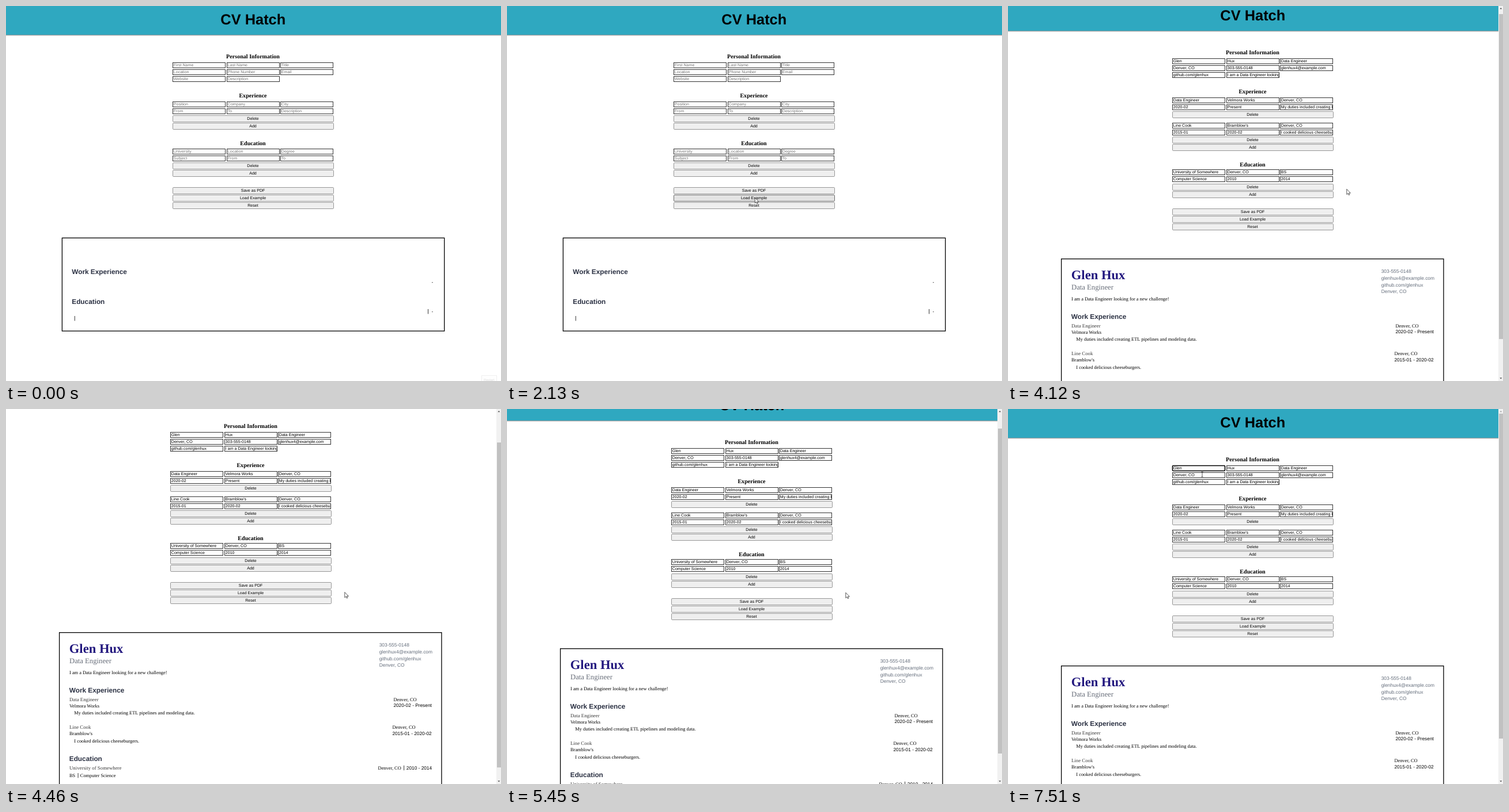
Recreate the animation shown at these times as an HTML page. Size 859 by 652 pixels, loop 8000 ms.

```html
<!DOCTYPE html>
<html lang="en">
<head>
<meta charset="utf-8">
<title>CV Hatch</title>
<style>
  html, body { margin: 0; width: 100%; height: 100%; overflow: hidden; background: #fff; }
  #stage { display: block; width: 859px; height: 652px; }
  text { text-rendering: geometricPrecision; white-space: pre; }
  .sans { font-family: "Liberation Sans", Arial, sans-serif; }
  .serif { font-family: "Liberation Serif", "Times New Roman", serif; }
  .bold { font-weight: bold; }
  .mid { text-anchor: middle; }
  .field { fill: #fff; stroke: #333; stroke-width: 1; }
  .field.focus { stroke: #000; stroke-width: 1.6; rx: 1.2px; }
  .btn { fill: #efefef; stroke: #8c8c8c; stroke-width: .9; }
  .btn.hover { fill: #e3e3e3; stroke: #5c5c5c; }
</style>
</head>
<body>
<svg id="stage" viewBox="0 0 859 652"></svg>
<script>
const LOOP = 8000, TICK = 66.5;
const LOADED = 2790, CLICKED = 6970, BLINK = 530;
const SHIFT = 43.6;              // height of a second job entry
const stage = document.getElementById('stage');

function add(parent, tag, attrs, content) {
  const el = document.createElementNS('http://www.w3.org/2000/svg', tag);
  for (const k in attrs) el.setAttribute(k, attrs[k]);
  if (content !== undefined) el.textContent = content;
  parent.appendChild(el);
  return el;
}
const label = (g, x, y, size, cls, s, fill = '#000') =>
  add(g, 'text', { x, y, 'font-size': size, class: cls, fill }, s);
const show = (el, on) => { el.style.display = on ? '' : 'none'; };
const snap = v => Math.round(v) + .5;

// ---------- form ----------
function makeView(width, left, ink) {
  const g = add(stage, 'g', {});
  const mid = left + 139.5, fields = [], buttons = [];

  add(g, 'rect', { width, height: 50, fill: '#2fa8c0' });
  add(g, 'rect', { y: 50, width, height: 1, fill: '#8b9a9e' });
  add(g, 'rect', { y: 51, width, height: .7, fill: '#d0d0d0' });
  label(g, width / 2 - .7, 32, 25.4, 'sans bold mid', 'CV Hatch');

  const head = (y, s) => label(g, mid, y, 10.1, 'serif bold mid', s);

  // fields wrap after three
  const inputs = (top, texts) => texts.forEach((s, i) => {
    const box = { x: snap(left + i % 3 * 93.6), y: snap(top + Math.floor(i / 3) * 12), width: 91, height: 9 };
    const el = add(g, 'rect', { class: 'field', ...box });
    label(add(g, 'svg', box), 1.3, 6.8, 7.07, 'sans', s, ink);
    fields.push({ el, ...box });
  });
  const actions = (top, ...names) => names.forEach((s, i) => {
    const box = { x: left + .5, y: snap(top + i * 13), width: 279, height: 11 };
    const el = add(g, 'rect', { class: 'btn', rx: 1.3, ...box });
    label(g, mid, box.y + 7.9, 7.07, 'sans mid', s);
    buttons.push({ el, ...box });
  });

  const build = (personal, jobs, school) => {
    const extra = (jobs.length - 1) * SHIFT;
    head(91.3, 'Personal Information');
    inputs(98, personal);
    head(159.4, 'Experience');
    jobs.forEach((job, i) => {
      inputs(166 + i * SHIFT, job);
      actions(190 + i * SHIFT, 'Delete');
    });
    actions(203 + extra, 'Add');
    head(241.9 + extra, 'Education');
    inputs(247.8 + extra, school);
    actions(272 + extra, 'Delete', 'Add');
    actions(315 + extra, 'Save as PDF', 'Load Example', 'Reset');
  };
  return { g, fields, buttons, build };
}

const frame = (g, x, y, height) =>
  add(g, 'rect', { x, y, width: 663.3, height, fill: 'none', stroke: '#000', 'stroke-width': 1.3 });
const bar = (g, x, y) => add(g, 'rect', { x, y: y - 4, width: .9, height: 8.4, fill: '#222' });
const section = (g, x, y, s) => label(g, x, y, 11.8, 'sans bold', s, '#2a3042');

// ---------- empty page ----------
const blank = makeView(859, 289, '#757575');
blank.build(
  ['First Name', 'Last Name', 'Title', 'Location', 'Phone Number', 'Email', 'Website', 'Description'],
  [['Position', 'Company', 'City', 'From', 'To', 'Description']],
  ['University', 'Location', 'Degree', 'Subject', 'From', 'To']);
frame(blank.g, 97.4, 403.3, 161.8);
section(blank.g, 114.3, 465.5, 'Work Experience');
section(blank.g, 114.3, 518.4, 'Education');
label(blank.g, 738.5, 482.7, 8.3, 'sans', '-');
label(blank.g, 738.5, 533.7, 8.3, 'sans', '-');
bar(blank.g, 732, 531);
bar(blank.g, 118.8, 543);

// ---------- filled page ----------
const full = makeView(851, 285, '#000');
const city = 'Denver, CO', trade = 'Data Engineer';
const intro = 'I am a Data Engineer looking for a new challenge!';
const contact = ['303-555-0148', 'glenhux4@example.com', 'github.com/glenhux', city];
const jobs = [
  [trade, 'Velmora Works', city, '2020-02', 'Present',
    'My duties included creating ETL pipelines and modeling data.'],
  ['Line Cook', "Bramblow's", city, '2015-01', '2020-02', 'I cooked delicious cheeseburgers.']
];
const school = ['University of Somewhere', city, 'BS', 'Computer Science', '2010', '2014'];
full.build(['Glen', 'Hux', trade, city, ...contact.slice(0, 3), intro], jobs, school);

const cv = full.g;
const body = (x, y, s) => label(cv, x, y, 8.4, 'serif', s);
const role = (y, s) => label(cv, 110, y, 8.8, 'serif', s, '#3c3c3c');
const dates = (x, y, from, to) => label(cv, x, y, 8.3, 'sans', `${from} - ${to}`);

frame(cv, 92.6, 446.7, 270);
label(cv, 109.8, 482, 22.6, 'serif bold', 'Glen Hux', '#22177e');
label(cv, 110, 499.8, 12.7, 'serif', trade, '#666c78');
body(110, 519, intro);
contact.forEach((s, i) => label(cv, 647.7, 470.7 + i * 11.9, 8.4, 'sans', s, '#646d7b'));

section(cv, 109.8, 551, 'Work Experience');
jobs.forEach(([title, firm, place, from, to, text], i) => {
  const y = 565.6 + i * 48.6, x = 672.4 - i * 2;
  role(y, title);
  body(110, y + 11.2, firm);
  body(118.3, y + 23.7, text);
  body(x, y, place);
  dates(x, y + 10.7, from, to);
});

section(cv, 109.8, 670, 'Education');
role(684.6, school[0]);
body(645.6, 684.6, city);
bar(cv, 690.2, 681.8);
dates(694.8, 684.6, school[4], school[5]);
body(110, 697.9, school[2]);
bar(cv, 124.6, 695);
body(128.8, 697.9, school[3]);

const caret = add(cv, 'rect', { x: 301.4, y: 99.6, width: .8, height: 7 });

// ---------- scrollbar ----------
const side = add(stage, 'g', {});
add(side, 'rect', { x: 851, width: 8, height: 652, fill: '#f1f1f1' });
const thumb = add(side, 'rect', { x: 852, width: 7, height: 565, fill: '#c1c1c1' });
const upArrow = add(side, 'path', { d: 'M853.3 5.2h4l-2-2.3z' });
add(side, 'path', { d: 'M853.3 646.3h4l-2 2.3z', fill: '#505050' });

// ---------- recorder hint ----------
const hint = add(stage, 'g', {});
add(hint, 'rect', { x: 825.5, y: 642.5, width: 26, height: 12, fill: '#fefefe', stroke: '#efefef' });
label(hint, 838.3, 652, 5.8, 'sans mid', 'Restart', '#dcdcdc');

// ---------- pointer ----------
const arrow = add(stage, 'path', {
  d: 'M.3 .3V9.6L2.4 7.7L3.9 10.8L5.3 10.1L3.9 7.2H6.9Z',
  fill: '#fff', stroke: '#222', 'stroke-width': .75
});
const beam = add(stage, 'path', {
  d: 'M-1.8-4.2H1.8M0-4.2V4.2M-1.8 4.2H1.8',
  fill: 'none', stroke: '#333', 'stroke-width': .8
});

// ---------- motion ----------
const STOPS = [                  // time, x, y
  [460, 700, 439], [865, 274, 31], [1330, 422, 263], [1990, 430, 333],
  [3150, 430, 332], [3590, 545, 308], [3860, 587.5, 318], [5700, 587.5, 319],
  [6110, 338, 113], [6320, 338, 113], [6510, 318, 109], [6980, 316, 103], [7310, 337, 113.6]
];
const ease = f => f * f * (3 - 2 * f);
const phase = (t, start, span) => ease(Math.min(1, Math.max(0, (t - start) / span)));

function pointer(t) {
  let [, x, y] = STOPS[0];
  for (let i = 1; i < STOPS.length; i++) {
    const [t0, x0, y0] = STOPS[i - 1], [t1, x1, y1] = STOPS[i];
    const f = phase(t, t0, t1 - t0);
    x += (x1 - x0) * f;
    y += (y1 - y0) * f;
  }
  return [x, y];
}
// two wheel notches down, two back up
const scrollAt = t => Math.round(
  53 * (phase(t, 4060, 270) - phase(t, 5270, 210)) +
  28 * (phase(t, 4400, 200) - phase(t, 5500, 260)));

const inside = (r, x, y) => x >= r.x && x <= r.x + r.width && y >= r.y && y <= r.y + r.height;

function draw(ms) {
  const t = Math.floor((ms % LOOP + 6) / TICK) * TICK;
  const loaded = t >= LOADED, focused = t >= CLICKED, moving = t >= STOPS[0][0];
  const view = loaded ? full : blank;
  const scroll = scrollAt(t), [x, y] = pointer(t);

  show(blank.g, !loaded);
  show(full.g, loaded);
  show(side, loaded);
  show(hint, t < TICK);
  full.g.setAttribute('transform', `translate(0 ${-scroll})`);
  thumb.setAttribute('y', 8 + scroll * .866);
  upArrow.setAttribute('fill', scroll > 0 ? '#505050' : '#a3a3a3');

  for (const b of view.buttons)
    b.el.classList.toggle('hover', moving && inside(b, x, y + scroll));
  const typing = view.fields.some(f => inside(f, x, y + scroll));
  for (const [el, on] of [[arrow, !typing], [beam, typing]]) {
    el.setAttribute('transform', `translate(${x} ${y})`);
    show(el, moving && on);
  }

  full.fields[0].el.classList.toggle('focus', focused);
  show(caret, focused && Math.floor((t - CLICKED) / BLINK) % 2 === 0);
}

const start = performance.now();
function tick() {
  draw(performance.now() - start);
  requestAnimationFrame(tick);
}
tick();
</script>
</body>
</html>
```
